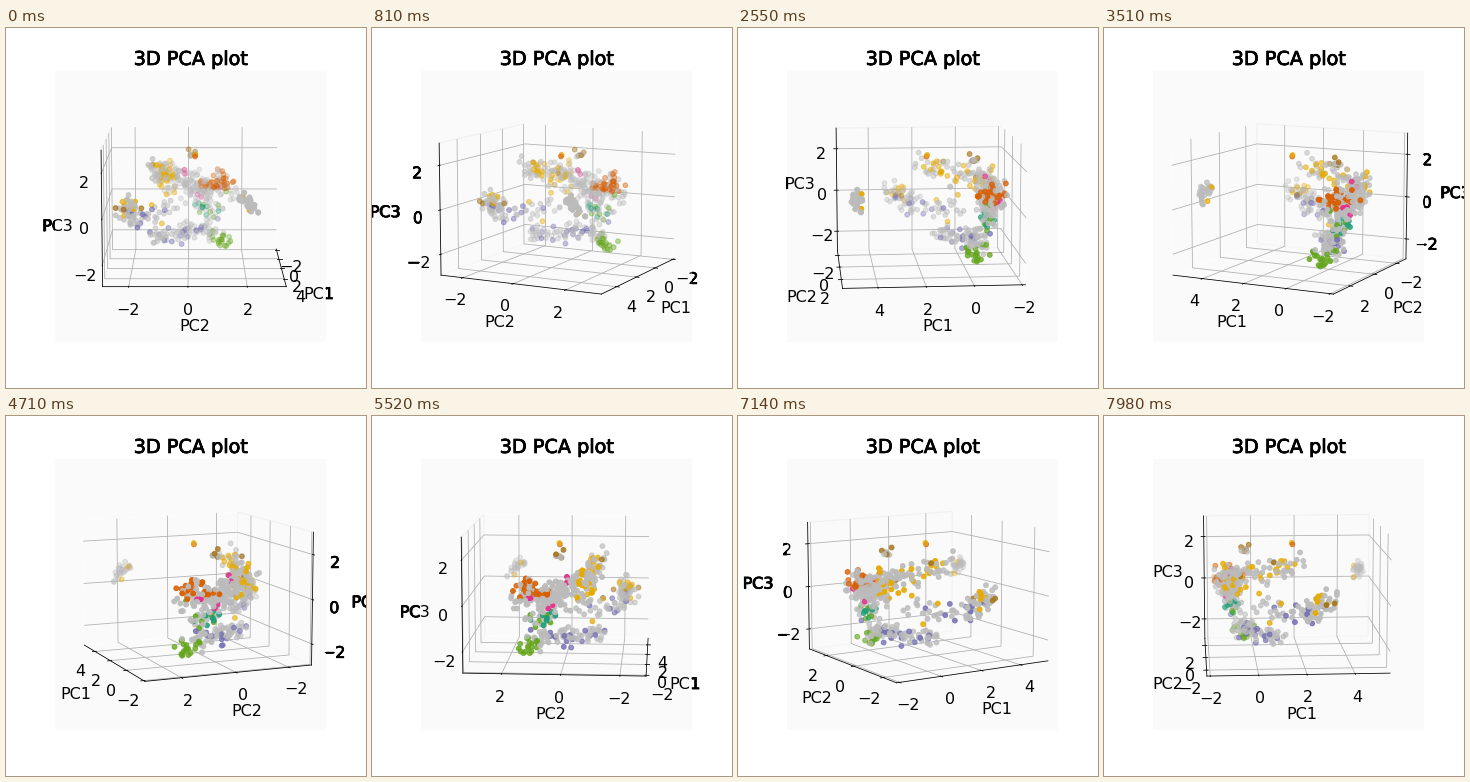
These frames come from a looping animation (360x360 px, 8000 ms). A matplotlib script:

```python
import numpy as np
import matplotlib.pyplot as plt
from matplotlib.animation import FuncAnimation
from matplotlib.patheffects import withStroke
from matplotlib.text import Text

STEPS = 267
LOOP_MS = 8000
TEXT = 16
BACK = "#fafafa"

GREY, TEAL, ORANGE, PURPLE = "#bbbbbb", "#1b9e77", "#d95f02", "#7570b3"
PINK, GREEN, GOLD, BROWN = "#e7298a", "#66a61e", "#e6ab02", "#a6761d"

# Middle of each axis range, its half width, and box units per data unit
MIDDLE = np.array([1.66, 0.22, 0.02])
HALF = np.array([3.80, 3.10, 2.97])
SCALE = 0.595 / HALF * [1, 1, 0.75]

rng = np.random.default_rng(12)


def strand(count, spread, *path):
    """Points strewn along a path through a few key points (box units)."""
    path = np.array(path)
    along = rng.random(count) * (len(path) - 1)
    knots = np.arange(len(path))
    line = np.column_stack([np.interp(along, knots, c) for c in path.T])
    return line + rng.normal(0, spread, line.shape)


def tint(x, y, z):
    """Each region of the cloud has its own leading colour."""
    chance = rng.random()
    if x > 0.4:
        return GOLD if chance < 0.05 else GREY
    if x > -0.1 and y > -0.1 and z > 0.3:
        return ORANGE if chance < 0.5 else GOLD
    if z < -0.27 and y > 0.12:
        return GREEN
    if z < -0.18:
        return PURPLE if chance < 0.16 else PINK if chance < 0.19 else GREY
    if z < -0.07 and y > 0:
        return TEAL if chance < 0.22 else GREEN if chance < 0.42 else GREY
    if z > 0.26 and x < -0.2:
        return BROWN if chance < 0.3 else GREY
    if y < -0.14 and z > -0.02:
        return GOLD if chance < 0.24 else BROWN if chance < 0.28 else GREY
    if x > -0.34 and z < 0.02:
        return PURPLE if chance < 0.15 else GOLD if chance < 0.22 else GREY
    if y > 0.04 and z > 0.03 and chance < 0.3 + y:
        return ORANGE
    return PINK if chance > 0.95 else GREEN if chance > 0.92 else GREY


def make_cloud():
    box = np.vstack([
        # main sheet and its lower fringe
        strand(175, 0.045, (-0.40, -0.22, 0.13), (-0.45, 0.0, 0.05),
               (-0.41, 0.27, 0.06)),
        strand(55, 0.045, (-0.44, 0.06, 0.03), (-0.40, 0.13, -0.16)),
        # floor, ending in the low corner
        strand(100, 0.034, (-0.10, -0.28, -0.25), (-0.30, -0.08, -0.26),
               (-0.36, 0.06, -0.24), (-0.31, 0.22, -0.34)),
        # wing, crest, peak, tip and the far island
        strand(85, 0.036, (0.26, -0.40, 0.03), (0.14, -0.47, -0.01),
               (0.06, -0.41, -0.10), (-0.28, -0.15, -0.06)),
        strand(50, 0.038, (0.02, -0.27, 0.27), (-0.12, -0.24, 0.18),
               (-0.36, -0.19, 0.16)),
        strand(9, 0.014, (-0.31, -0.05, 0.31), (-0.33, 0.0, 0.29)),
        strand(2, 0.008, (0.0, 0.0, 0.338), (0.0, 0.0, 0.338)),
        strand(27, 0.018, (0.49, 0.30, 0.13), (0.48, 0.42, 0.02)),
    ])
    box = np.clip(box, [-0.53, -0.53, -0.41], [0.53, 0.53, 0.41])
    return MIDDLE + box / SCALE, [tint(*p) for p in box]


def make_axes(fig):
    ax = fig.add_axes([49.3 / 360, 46 / 360, 271 / 360, 271 / 360],
                      projection="3d", facecolor=BACK)
    low, high = MIDDLE - HALF, MIDDLE + HALF
    ax.set(xlim=(low[0], high[0]), ylim=(low[1], high[1]),
           zlim=(low[2], high[2]))
    ax.set(xticks=[-2, 0, 2, 4], yticks=[-2, 0, 2], zticks=[-2, 0, 2])
    ax.tick_params(labelsize=TEXT, pad=4.6)
    for i, axis in enumerate((ax.xaxis, ax.yaxis, ax.zaxis)):
        axis.set_label_text(f"PC{i + 1}", fontsize=TEXT)
        axis.labelpad = 10
        axis.pane.fill = False
        axis.pane.set_edgecolor("white")
    ax.yaxis.pane.set_edgecolor((0.9, 0.9, 0.9, 0.5))
    ax.set_title("3D PCA plot", fontsize=1.2 * TEXT, pad=6)
    return ax


fig = plt.figure(figsize=(5, 5), dpi=72, facecolor="white")
# The lower axes show only outside the panel, where text looks heavier
under, ax = make_axes(fig), make_axes(fig)
for text in under.findobj(Text):
    text.set_path_effects([withStroke(linewidth=0.7, foreground="black")])
points, colors = make_cloud()
ax.scatter(*points.T, c=colors, s=23)


def update(step):
    # The tiny offset settles which walls show at right angles
    for layer in (under, ax):
        layer.view_init(elev=10, azim=step + 0.001)
    return under, ax


anim = FuncAnimation(fig, update, frames=STEPS, init_func=lambda: update(0),
                     interval=LOOP_MS / STEPS, repeat=True, repeat_delay=0,
                     blit=False)
plt.show()
```
